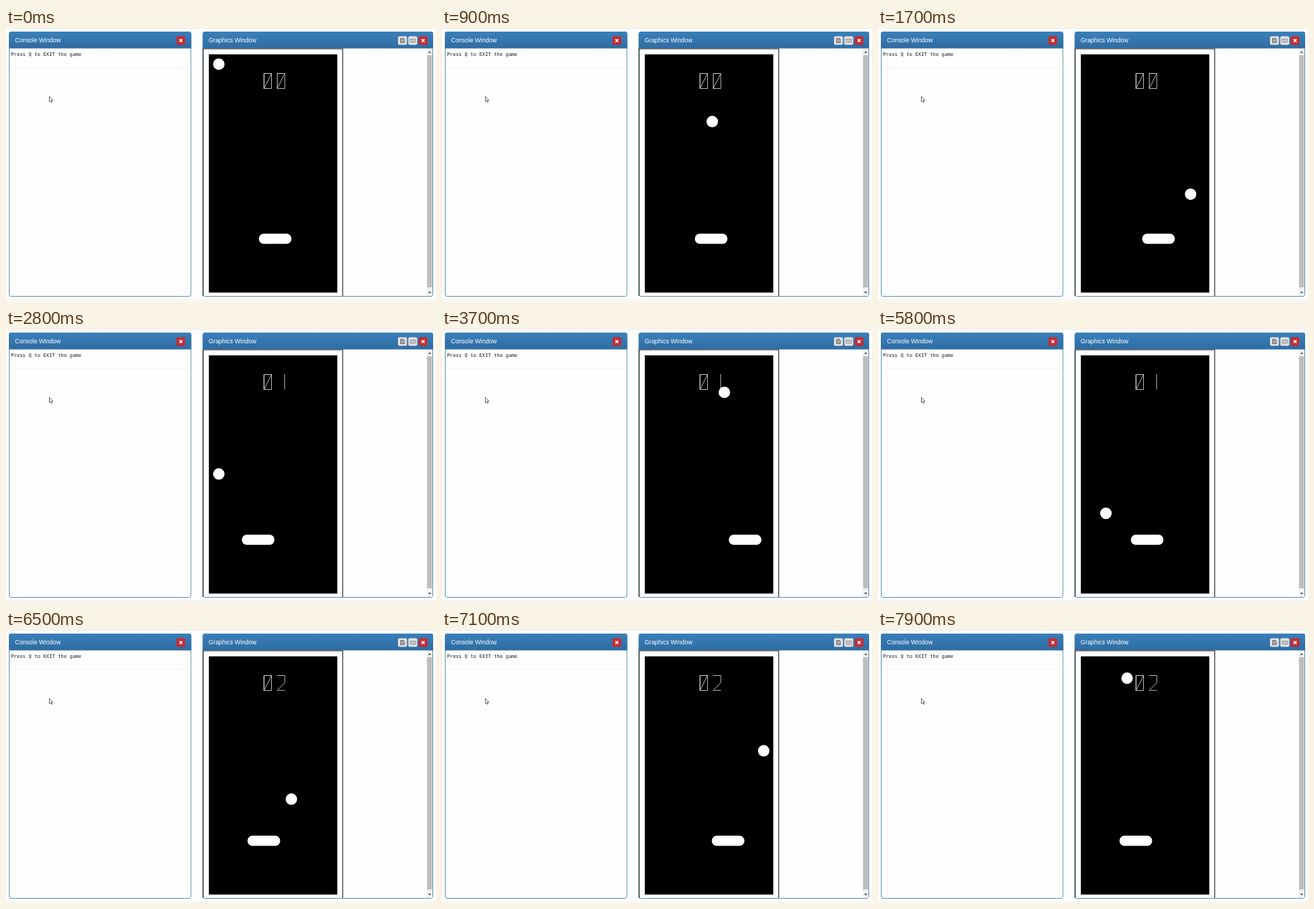
Recreate the animation shown at these times as an HTML page. Size 600 by 381 pixels, loop 8 s.

```html
<!DOCTYPE html>
<html lang="en">
<head>
<meta charset="utf-8">
<title>Paddle game</title>
<style>
  html, body { margin: 0; width: 100%; height: 100%; overflow: hidden; background: #fefefe; }
  svg { display: block; width: 600px; height: 381px; }
  .title { font: 8.5px "Liberation Sans", Arial, sans-serif; fill: #fff; }
  .console { font: 6.8px "DejaVu Sans Mono", monospace; fill: #1c1c1c; }
  .frame { fill: #fefefe; stroke: #5f97ae; }
  .digit { fill: none; stroke: #c4c4c4; stroke-width: .9; }
</style>
</head>
<body>
<svg viewBox="0 0 600 381">
  <defs>
    <linearGradient id="bar" x2="0" y2="1">
      <stop stop-color="#3a80ba"/><stop offset="1" stop-color="#2e6ca3"/>
    </linearGradient>
    <clipPath id="court"><rect x="283" y="36.5" width="179.5" height="333"/></clipPath>
    <g id="close">
      <rect width="12" height="12" rx="2" fill="#c82a30"/>
      <path d="M4 4l4 4M8 4l-4 4" stroke="#fff" stroke-width="1.6"/>
    </g>
    <rect id="key" width="12.5" height="12" rx="2" fill="#e4e2e0"/>
  </defs>

  <path d="M0 .5H600M0 379.5H600" stroke="#e9ebee"/>

  <!-- console -->
  <rect class="frame" x="4.5" y="5.5" width="253.5" height="369" rx="2.5"/>
  <path d="M4 28.5V8q0-3 3-3H255.500q3 0 3 3V28.500z" fill="url(#bar)"/>
  <text class="title" x="12.5" y="19.600">Console Window</text>
  <use href="#close" x="238" y="11.5"/>
  <text class="console" x="7" y="39">Press Q to EXIT the game</text>
  <path d="M5 55H257" stroke="#f1f1f1"/>
  <path d="M60.500 95.500v7.300l1.700-1.500 1.100 2.500 1.100-.5-1.100-2.400h2.200z" fill="#fff" stroke="#333" stroke-width=".7"/>

  <!-- graphics -->
  <rect class="frame" x="275" y="5.5" width="320.500" height="369" rx="2.5"/>
  <path d="M274.500 28.500V8q0-3 3-3H593q3 0 3 3V28.500z" fill="url(#bar)"/>
  <text class="title" x="282.700" y="19.600">Graphics Window</text>
  <use href="#key" x="547" y="11.500"/>
  <path d="M550.500 14.500h4.500l1 1v5h-5.500zM551.800 14.500v2h2.500v-2M551.800 20.500v-2.200h3v2.200" fill="none" stroke="#555" stroke-width=".8"/>
  <use href="#key" x="561.300" y="11.500"/>
  <rect x="564" y="15.500" width="7.200" height="4.500" fill="none" stroke="#777" stroke-width=".7"/>
  <path d="M565 17h5.500M565.500 18.600h4.500" stroke="#777" stroke-width=".7" stroke-dasharray="1 .5"/>
  <use href="#close" x="576" y="11.500"/>
  <path d="M275 374V29H469.800V374" fill="none" stroke="#222" stroke-width="1.100"/>
  <rect x="587" y="29" width="8" height="345" fill="#f1f1f1"/>
  <rect x="587.500" y="38" width="7" height="324" fill="#bdbdbd"/>
  <path d="M589 34.700l2.200-2.400 2.200 2.400zM589 368l2.200 2.400 2.200-2.400z" fill="#505050"/>

  <g clip-path="url(#court)">
    <rect x="283" y="36.500" width="179.500" height="333"/>
    <path id="tens" class="digit" transform="translate(359.500 63)"/>
    <path id="ones" class="digit" transform="translate(378 63)"/>
    <rect id="paddle" y="287" width="45.500" height="14.300" rx="7" fill="#fff"/>
    <circle id="ball" r="8" fill="#fff"/>
  </g>
</svg>
<script>
  const LOOP = 8000, STEP = 100;
  const TICK = 4.22;    // ball travel per game tick, on both axes
  const NUDGE = 7.9;    // paddle travel per key press
  const COLS = 40, ROWS = 58;
  const DIGITS = ["M.5 .5H11V21.500H.5zL11 .5M.5 .5V21.500L11 .5", "M10.800 0V21.500", "M0 .5H11V10.500L.5 21.300H11.300"];

  // [time, ticks played] and [time, paddle offset in key presses]
  const ticks = [[0, 0], [267, 0], [1700, 43], [2800, 76], [4600, 130], [5800, 165],
    [7000, 197], [7100, 200], [7200, 204], [7900, 224]];
  const presses = [[0, 0], [1300, 0], [1500, 2], [2300, 2], [2800, -3], [3500, 6], [3700, 6],
    [4400, 0], [5000, 0], [5300, 4], [5400, 4], [5800, 0], [6000, -4], [6300, -4],
    [7100, 3], [7300, 3], [7900, -2]];

  const get = id => document.getElementById(id);
  const ball = get("ball"), paddle = get("paddle"), ones = get("ones");
  get("tens").setAttribute("d", DIGITS[0]);

  function at(keys, t) {
    const i = keys.findIndex(k => k[0] >= t);
    if (i <= 0) return keys[0][1];
    const [t0, a] = keys[i - 1], [t1, b] = keys[i];
    return Math.round(a + (b - a) * (t - t0) / (t1 - t0));
  }

  // back and forth between 0 and size
  const bounce = (n, size) => size - Math.abs(n % (2 * size) - size);

  function draw(now) {
    const t = Math.floor(now % LOOP / STEP) * STEP;
    const n = at(ticks, t) + 2;
    ball.setAttribute("cx", 288.5 + TICK * bounce(n, COLS));
    ball.setAttribute("cy", 42 + TICK * bounce(n, ROWS));
    paddle.setAttribute("x", 352.8 + NUDGE * at(presses, t));
    ones.setAttribute("d", DIGITS[Math.floor((n + ROWS) / (2 * ROWS))]);
  }

  const start = performance.now();
  function frame() {
    draw(performance.now() - start);
    requestAnimationFrame(frame);
  }
  frame();
</script>
</body>
</html>
```
